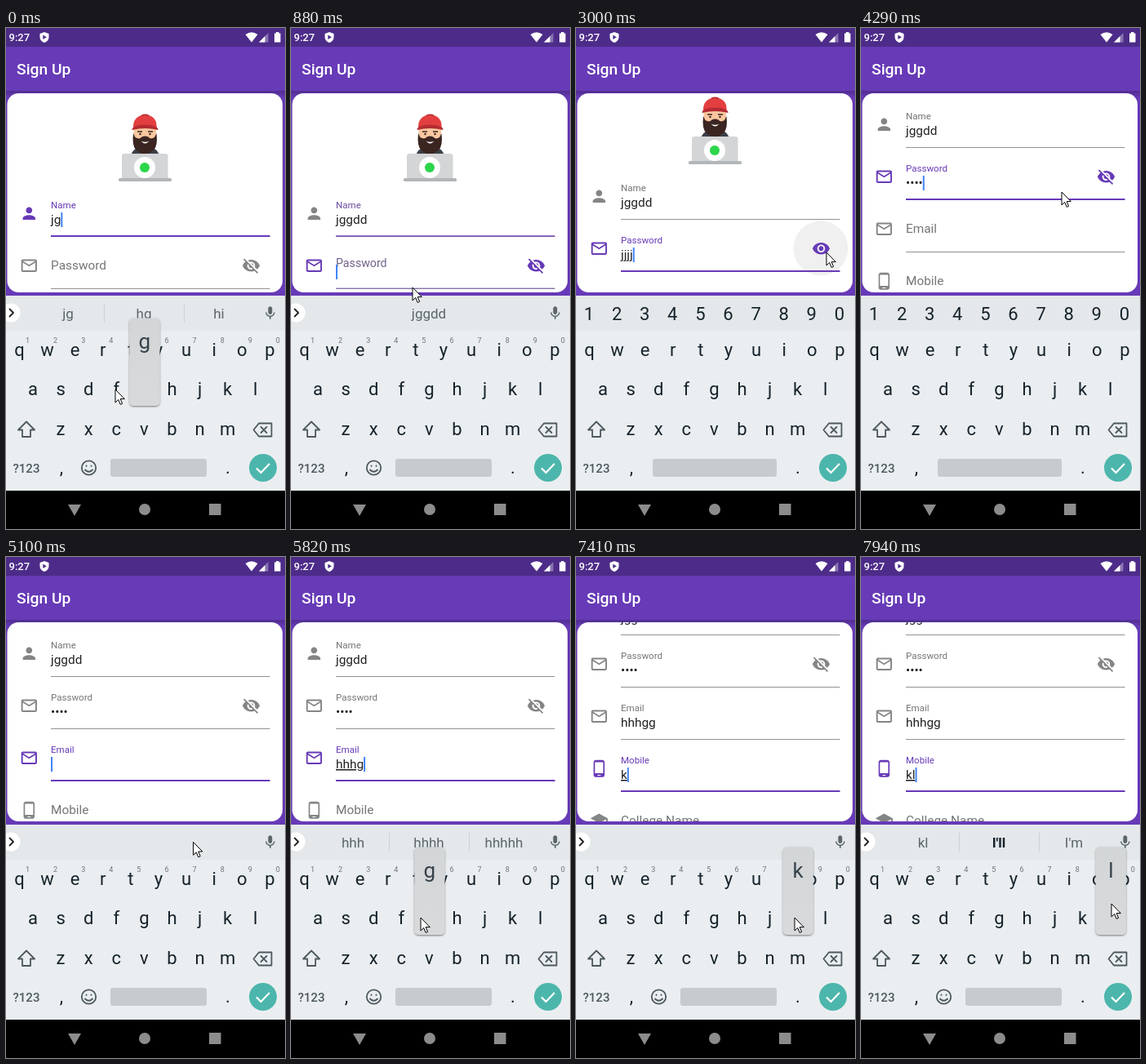
Animation, 342 px wide and 614 px high, one loop 7.99 s. Source, as an HTML page:

```html
<!DOCTYPE html>
<html lang="en">
<head>
<meta charset="utf-8">
<title>Sign Up</title>
<style>
  html, body { margin: 0; width: 100%; height: 100%; overflow: hidden; background: #000; }
  svg { display: block; width: 100%; height: 100%; }
  text { font-family: Roboto, sans-serif; white-space: pre; }
  .key { font-size: 22px; fill: #16232b; text-anchor: middle; }
  .hint { font-size: 9px; fill: #6a7479; text-anchor: middle; }
  .word { font-size: 17px; fill: #5b656a; text-anchor: middle; }
  .value { font-size: 15.4px; fill: #212121; }
  .line { fill: none; stroke: #4d585e; stroke-width: 1.8; stroke-linejoin: round; stroke-linecap: round; }
</style>
</head>
<body>
<svg viewBox="0 0 342 614">
  <defs>
    <clipPath id="cardClip"><rect x="1.5" y="80" width="337.5" height="244" rx="14"/></clipPath>
    <linearGradient id="barShadow" x2="0" y2="1">
      <stop stop-color="#000" stop-opacity=".22"/><stop offset="1" stop-color="#000" stop-opacity="0"/>
    </linearGradient>
    <linearGradient id="popFill" x2="0" y2="1">
      <stop stop-color="#d3d6d8"/><stop offset="1" stop-color="#d8d9da"/>
    </linearGradient>
    <filter id="popShadow" x="-30%" y="-10%" width="160%" height="125%">
      <feDropShadow dx="0" dy="1" stdDeviation="1.3" flood-opacity=".5"/>
    </filter>
  </defs>

  <rect width="342" height="330" fill="#673ab7"/>
  <rect y="77" width="342" height="8" fill="url(#barShadow)"/>
  <rect width="342" height="23" fill="#4d2c89"/>
  <g fill="#fff">
    <text x="3.5" y="16" font-size="13" font-weight="500">9:27</text>
    <path d="M47 5l5.5 2v4c0 3.500-2.500 6-5.500 7-3-1-5.500-3.500-5.500-7V7z"/>
    <path d="M45.300 8.500v5.500l4.500-2.750z" fill="#4d2c89"/>
    <path d="M301 17.500L293.500 8q7.500-5.500 15 0z"/>
    <path d="M310 17.500h11.500V6z" opacity=".35"/>
    <path d="M310 17.500h7.500V10z"/>
    <path d="M331 5h3.500v1.500h2V17.500h-7.500V6.500h2z"/>
    <text x="13" y="57" font-size="19.250" font-weight="500">Sign Up</text>
  </g>

  <rect x="1.5" y="80" width="337.5" height="244" rx="14" fill="#fff"/>
  <g clip-path="url(#cardClip)">
    <g id="form">
      <g id="avatar">
        <path d="M153 158q1-10 11-12h13q10 2 11 12z" fill="#3c3f48"/>
        <path d="M164 142h13v7q-6.500 5-13 0z" fill="#e9ad85"/>
        <path d="M156.500 122h27.500v13q-2 14-13.750 15-11.750-1-13.750-15z" fill="#fac79f"/>
        <path d="M156 129l2.500 5q5 3 8-.5 4-2 8 0 3 3.500 7.500.5l2.500-5q2 16-4 21-10.500 8.500-20.500 0-6-5-4-21z" fill="#3b2521"/>
        <path d="M165.500 138.500q5 2.500 10 0-5 6-10 0z" fill="#fff"/>
        <path d="M161 127h6m7 0h6" stroke="#3b2521" stroke-width="1.500"/>
        <circle cx="164.500" cy="130" r="1.200" fill="#302020"/><circle cx="176.500" cy="130" r="1.200" fill="#302020"/>
        <path d="M156 123q-1-15 14.500-17 15.500 2 14 17z" fill="#e33f40"/>
        <path d="M154.500 125q0-6 16-6.500 16 .5 16 6.500-16-4-32 0z" fill="#b52c32"/>
        <path d="M166 107.500q4.500-2.500 9 0" stroke="#b52c32" fill="none" stroke-width="1.500"/>
        <rect x="142" y="154" width="56.500" height="32" rx="3" fill="#d3d5d6"/>
        <rect x="138" y="184" width="65" height="4" rx="1.500" fill="#b3b6b8"/>
        <circle cx="170" cy="171" r="13" fill="#fff"/>
        <circle cx="170" cy="171" r="6" fill="#2bd64b"/>
      </g>
    </g>
  </g>

  <rect y="328" width="342" height="239" fill="#eaeef1"/>
  <rect y="328" width="342" height="43" fill="#e4e8ea"/>
  <g id="strip">
    <path id="dividers" d="M120.500 338v23M218.500 338v23" stroke="#cdd2d5"/>
    <circle cx="6" cy="349" r="11.500" fill="#fff"/>
    <path d="M4.500 344.500l4.500 4.500-4.500 4.500" class="line" style="stroke:#222"/>
    <path transform="translate(314 339.500) scale(.82)" fill="#5b656a" d="M12 14c1.660 0 3-1.340 3-3V5c0-1.660-1.340-3-3-3S9 3.340 9 5v6c0 1.660 1.340 3 3 3zm5.300-3c0 3-2.540 5.100-5.300 5.100S6.700 14 6.700 11H5c0 3.410 2.720 6.230 6 6.720V21h2v-3.280c3.280-.48 6-3.300 6-6.720z"/>
    <circle cx="101.500" cy="539" r="8.700" class="line"/>
    <path d="M97 541.500q4.500 4.500 9 0M98.500 536.500v.4M104.500 536.500v.4" class="line"/>
  </g>
  <g id="digits"></g>
  <g id="keys">
    <path d="M25 482.500l10 10h-5v8.500h-10v-8.500h-5z" class="line"/>
    <path d="M310 484.500h15.500v16h-15.500l-6.500-8zM312.500 489l7 7m0-7l-7 7" class="line"/>
    <text x="25" y="544.500" font-size="15" font-weight="500" fill="#4d585e" text-anchor="middle">?123</text>
    <rect id="space" y="528" height="22" rx="3" fill="#c7cbce"/>
    <circle cx="315" cy="539" r="17" fill="#4db6ac"/>
    <path d="M307 539.500l5.500 5.500 10.500-11" fill="none" stroke="#fff" stroke-width="2.200"/>
  </g>
  <g id="popup">
    <rect x="-18.500" y="355.500" width="37" height="107.500" rx="5" fill="url(#popFill)" filter="url(#popShadow)"/>
    <text id="popChar" y="393" font-size="26" fill="#36424a" text-anchor="middle"></text>
  </g>

  <rect y="567" width="342" height="47"/>
  <g fill="#8c8c8c">
    <path d="M76 584h16l-8 14z"/><circle cx="170" cy="590" r="7"/><rect x="249" y="583" width="14.500" height="14"/>
  </g>
  <path id="mouse" d="M0 0V16L3.700 12.500 6.200 18.400 8.600 17.400 6.200 11.600H11.300Z" fill="#fff" stroke="#000"/>
</svg>
<script>
const LOOP = 7990, FADE = 130, PURPLE = '#673ab7', GREY = '#858585';
const $ = id => document.getElementById(id);

function add(parent, tag, attrs, text = '') {
  const node = document.createElementNS('http://www.w3.org/2000/svg', tag);
  set(node, attrs);
  node.textContent = text;
  return parent.appendChild(node);
}
function set(node, attrs) {
  for (const name in attrs) node.setAttribute(name, attrs[name]);
}
const show = (node, on) => set(node, { visibility: on ? 'visible' : 'hidden' });
const clamp = v => Math.min(1, Math.max(0, v));
const mix = (a, b, p) => a + (b - a) * p;
const smooth = p => p * p * (3 - 2 * p);
const within = (t, spans) => spans.some(([a, b]) => t >= a && t < b);

// Value of the last entry [time, value] already reached
const latest = (t, list) => list.reduce((v, [at, next]) => t >= at ? next : v, null);

// Eased interpolation through stops [time, ...values]
function track(t, stops) {
  const i = stops.findIndex(s => s[0] > t);
  if (i < 0) return stops[stops.length - 1].slice(1);
  if (i === 0) return stops[0].slice(1);
  const a = stops[i - 1], b = stops[i], p = smooth((t - a[0]) / (b[0] - a[0]));
  return a.slice(1).map((v, k) => mix(v, b[k + 1], p));
}

const ICON = {
  person: 'M12 12c2.21 0 4-1.79 4-4s-1.79-4-4-4-4 1.79-4 4 1.79 4 4 4zm0 2c-2.67 0-8 1.34-8 4v2h16v-2c0-2.66-5.33-4-8-4z',
  mail: 'M20 4H4c-1.1 0-2 .9-2 2v12c0 1.1.9 2 2 2h16c1.1 0 2-.9 2-2V6c0-1.1-.9-2-2-2zm0 14H4V8l8 5 8-5v10zm-8-7L4 6h16l-8 5z',
  phone: 'M16 1H8C6.34 1 5 2.34 5 4v16c0 1.66 1.34 3 3 3h8c1.66 0 3-1.34 3-3V4c0-1.66-1.34-3-3-3zm-2 20h-4v-1h4v1zm3.25-3H6.75V4h10.5v14z',
  school: 'M5 13.18v4L12 21l7-3.82v-4L12 17l-7-3.82zM12 3L1 9l11 6 9-4.91V17h2V9L12 3z',
  eye: 'M12 4.5C7 4.5 2.73 7.61 1 12c1.73 4.39 6 7.5 11 7.5s9.27-3.11 11-7.5c-1.73-4.39-6-7.5-11-7.5zM12 17c-2.76 0-5-2.24-5-5s2.24-5 5-5 5 2.24 5 5-2.24 5-5 5zm0-8c-1.66 0-3 1.34-3 3s1.34 3 3 3 3-1.34 3-3-1.34-3-3-3z',
  eyeOff: 'M12 7c2.76 0 5 2.24 5 5 0 .65-.13 1.26-.36 1.83l2.92 2.92c1.51-1.26 2.7-2.89 3.43-4.75-1.73-4.39-6-7.5-11-7.5-1.4 0-2.74.25-3.98.7l2.16 2.16C10.74 7.13 11.35 7 12 7zM2 4.27l2.74 2.74C3.08 8.3 1.78 10.02 1 12c1.73 4.39 6 7.5 11 7.5 1.55 0 3.03-.3 4.38-.84L19.73 22 21 20.73 3.27 3 2 4.27zM7.53 9.8l1.55 1.55c-.05.21-.08.43-.08.65 0 1.66 1.34 3 3 3 .22 0 .44-.03.65-.08l1.55 1.55c-.67.33-1.41.53-2.2.53-2.76 0-5-2.24-5-5 0-.79.2-1.53.53-2.2zm4.31-.78l3.15 3.15.02-.16c0-1.66-1.34-3-3-3z'
};

// focus: [from, to]; typed: [time, text]
const FIELDS = [
  { name: 'Name', icon: 'person', focus: [-1000, 840], typed: [[0, 'jg'], [60, 'jgg'], [280, 'jggd'], [430, 'jggdd']] },
  { name: 'Password', icon: 'mail', focus: [840, 4800], typed: [[1600, 'j'], [1760, 'jj'], [1920, 'jjj'], [2080, 'jjjj']] },
  { name: 'Email', icon: 'mail', focus: [4800, 6800], typed: [[5460, 'h'], [5560, 'hh'], [5660, 'hhh'], [5800, 'hhhg'], [6000, 'hhhgg']] },
  { name: 'Mobile', icon: 'phone', focus: [6800, 9000], typed: [[7400, 'k'], [7800, 'kl']] },
  { name: 'College Name', icon: 'school', focus: [9000, 9999], typed: [] }
];
const PRESSES = [['g', 0, 60], ['g', 70, 150], ['d', 270, 350], ['d', 420, 500],
  ...[1600, 1760, 1920, 2080].map(t => ['j', t, t + 90]),
  ...[5460, 5560, 5660].map(t => ['h', t, t + 70]),
  ['g', 5790, 5880], ['g', 5990, 6080], ['k', 7390, 7500], ['l', 7790, LOOP]];
const WORDS = [[0, 'jg,hg,hi'], [150, 'jgg,hgg,hhh'], [350, 'jggd,jggs,jgged'], [560, ',jggdd,'], [4900, ',,'],
  [5500, 'h,he,hi'], [5600, 'hh,hhh,hhhh'], [5710, 'hhh,hhhh,hhhhh'], [5900, 'hhhg,hhhh,hhh g'],
  [6080, 'hhhgg,hhhhh,hhh ggg'], [6850, ',,'], [7450, 'k,ok,kk'], [7850, "kl,I'll,I'm"]];
const SCROLL = [[0, 0], [1000, 0], [1250, 19], [1530, 19], [1600, 21], [3620, 21], [4220, 109], [6300, 109], [6590, 160]];
const MOUSE = [[0, 134, 443], [130, 106, 444], [480, 106, 444], [600, 150, 312], [810, 150, 312], [880, 149, 318],
  [1020, 149, 318], [1370, 234, 440], [1530, 234, 440], [1620, 236, 462], [2120, 236, 462], [2270, 245, 381],
  [2330, 247, 380], [2590, 307, 275], [3480, 307, 275], [3620, 250, 295], [4220, 246, 201], [4300, 246, 201],
  [4530, 262, 250], [4900, 262, 250], [5290, 200, 440], [5700, 200, 440], [5810, 159, 442], [6080, 159, 442],
  [6240, 202, 298], [6300, 202, 297], [6590, 198, 245], [6750, 198, 245], [6850, 198, 252], [7300, 268, 442],
  [7550, 268, 442], [7720, 307, 425]];
const CARET_OFF = [[2540, 3000], [3180, 3600], [3950, 4290], [4530, 4850], [6500, 6850]];
const DIGIT_MODE = [[1050, 4900]], REVEALED = [[3000, 3180]];

const place = x => `translate(${x - 11.55} 215.7) scale(.9625)`;
const form = $('form');
const ripple = add(form, 'circle', { cx: 300, cy: 291, r: 33.5 });
FIELDS.forEach((f, i) => {
  const g = add(form, 'g', { transform: `translate(0 ${64 * i})` });
  f.iconNode = add(g, 'path', { d: ICON[f.icon], transform: place(28.3) });
  f.label = add(g, 'text', { x: 55 }, f.name);
  f.value = add(g, 'text', { x: 55, y: 240, class: 'value' });
  add(g, 'rect', { x: 55, y: 255, width: 268.5, height: 1, fill: '#929292' });
  f.bar = add(g, 'rect', { x: 55, y: 254, width: 268.5, height: 2, fill: PURPLE });
  f.caret = add(g, 'rect', { y: 226, width: 2, height: 18, fill: '#4285f4' });
  if (i === 1) f.eye = add(g, 'path', { transform: place(300.5) });
});

const keyX = {};
['qwertyuiop', 'asdfghjkl', 'zxcvbnm'].forEach((row, r) => [...row].forEach((c, i) => {
  keyX[c] = [16.5, 33, 67][r] + 34.1 * i;
  add($('keys'), 'text', { x: keyX[c], y: [402, 450, 499][r], class: 'key' }, c);
}));
add($('keys'), 'text', { x: 68, y: 546, class: 'key' }, ',');
add($('keys'), 'text', { x: 272, y: 546, class: 'key' }, '.');
[...'1234567890'].forEach((c, i) => {
  add($('digits'), 'text', { x: 16 + 34.1 * i, y: 358, class: 'key' }, c);
  add($('strip'), 'text', { x: 26.5 + 34.1 * i, y: 386, class: 'hint' }, c);
});
const slots = [76, 169, 261].map(x => add($('strip'), 'text', { x, y: 356, class: 'word' }));

function drawField(f, t) {
  const [from, to] = f.focus, active = t >= from && t < to;
  const float = clamp((t - from) / FADE), glow = float - clamp((t - to) / FADE);
  const tint = active ? PURPLE : GREY;
  const masked = f.eye && !within(t, REVEALED);
  const text = latest(t, f.typed) || '';
  f.iconNode.setAttribute('fill', tint);
  set(f.label, {
    y: mix(232.3, 221, float), 'font-size': mix(15.4, 11.55, float),
    fill: `rgb(${mix(117, 103, glow)},${mix(117, 58, glow)},${mix(117, 183, glow)})`
  });
  f.value.textContent = masked ? '•'.repeat(text.length) : text;
  f.value.setAttribute('text-decoration', active && !f.eye ? 'underline' : 'none');
  f.bar.setAttribute('opacity', glow);
  show(f.caret, active && !within(t, CARET_OFF));
  f.caret.setAttribute('x', 55 + (text ? f.value.getComputedTextLength() : 0));
  if (f.eye) set(f.eye, { d: masked ? ICON.eyeOff : ICON.eye, fill: tint });
}

function draw(t) {
  FIELDS.forEach(f => drawField(f, t));
  form.setAttribute('transform', `translate(0 ${-track(t, SCROLL)[0]})`);
  ripple.setAttribute('opacity', .06 * clamp((t - 2880) / 90) * clamp((3400 - t) / 150));

  const digits = within(t, DIGIT_MODE);
  show($('digits'), digits);
  show($('strip'), !digits);
  set($('space'), digits ? { x: 94, width: 152 } : { x: 128, width: 118 });

  const words = latest(t, WORDS).split(',');
  slots.forEach((s, i) => {
    s.textContent = words[i];
    s.style.fontWeight = words[i] === "I'll" ? 700 : 400;
    s.style.fill = words[i] === "I'll" ? '#16232b' : '';
  });
  $('dividers').setAttribute('opacity', words[0] ? 1 : 0);

  const press = PRESSES.find(p => t >= p[1] && t < p[2]);
  show($('popup'), press);
  if (press) {
    $('popup').setAttribute('transform', `translate(${keyX[press[0]] + .5} 0)`);
    $('popChar').textContent = press[0];
  }
  $('mouse').setAttribute('transform', `translate(${track(t, MOUSE)})`);
}

function tick() {
  draw(performance.now() % LOOP);
  requestAnimationFrame(tick);
}
tick();
</script>
</body>
</html>
```
